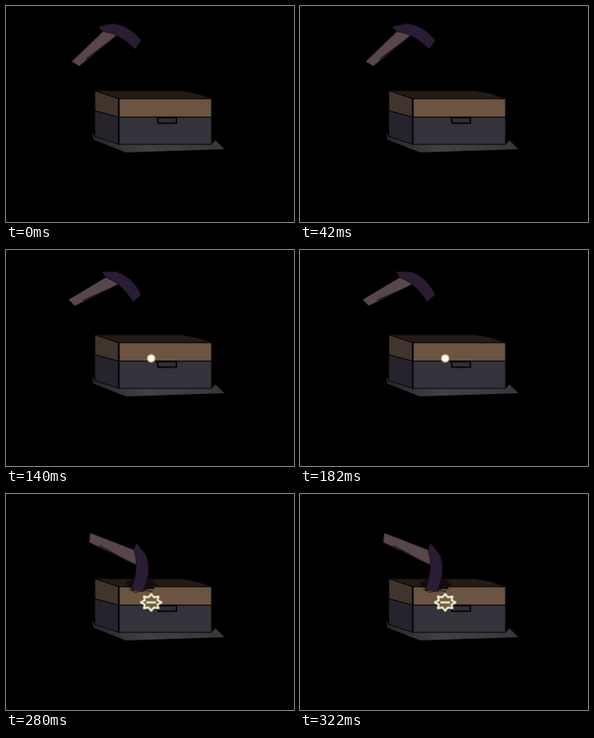
Recreate the animation shown at these times as an HTML page. Size 360 px wide and 270 px high, loop 350 ms.

```html
<!DOCTYPE html>
<html lang="en">
<head>
<meta charset="utf-8">
<title>Hammer and box</title>
<style>
  html, body { margin: 0; width: 100%; height: 100%; overflow: hidden; background: #000; }
  svg { display: block; width: 100vw; height: 100vh; }
  .ink { stroke: #09060b; stroke-width: 1.2; stroke-linejoin: round; }
  #hammer .ink { stroke-width: .6; }
</style>
</head>
<body>
<svg viewBox="0 0 360 270">
  <defs>
    <linearGradient id="stone" x2="1">
      <stop offset="0" stop-color="#26262a"/>
      <stop offset=".4" stop-color="#414145"/>
      <stop offset="1" stop-color="#37373b"/>
    </linearGradient>
  </defs>
  <path fill="url(#stone)" d="M108 158L111 163 142 173H257L262 168 273 179 150 183 109 167Z"/>
  <g class="ink">
    <path fill="#241b14" d="M111 106H218Q238 108 257 116H141Z"/>
    <path fill="#40352c" d="M111 106L141 116V139L111 131Z"/>
    <path fill="#26232c" d="M111 131L141 139V173L111 163Z"/>
    <path fill="#6b5441" d="M141 116H257V139H141Z"/>
    <path fill="#34333b" d="M141 139H257V173H141Z"/>
    <path fill="none" stroke-width="2.2" d="M141 116V173"/>
    <path fill="#302e36" stroke-width="2" d="M189 139.500H213V146.500H190Z"/>
  </g>
  <g id="dent" transform="translate(169 113)">
    <path id="hole" fill="#120d0d"/>
    <path fill="none" stroke="#38291f" stroke-width="1.5" d="M-15 6L-7 10 4 7 14 9"/>
  </g>
  <!-- Drawn around the joint of head and handle -->
  <g id="hammer">
    <path class="ink" fill="#58464a" d="M-55 20L-8 -8 9 0 -47 28Z"/>
    <path fill="none" stroke="#130d11" stroke-width="1.2" d="M-37 21L-2 6"/>
    <path class="ink" fill="#2a1c33" d="M-13 -15L5 -15Q25 -9 36 14L26 23Q10 -2 -9 -8Z"/>
  </g>
  <g transform="translate(181.500 135.500)">
    <circle id="dot" r="1" fill="#fffdf2" stroke="#b8894a" stroke-width=".2"/>
    <g id="burst">
      <path id="rays" fill="#6f5f46" stroke="#fffbd7" stroke-width="2.2" stroke-linejoin="round"/>
      <path stroke="#fff6d0" stroke-width="2.4" d="M-6 0H6"/>
    </g>
  </g>
</svg>
<script>
const STEP = 70;
const $ = id => document.getElementById(id);

// Closed zigzag around the origin, alternating between two radii.
function star(points, rx, ry, inner) {
  const corners = Array.from({ length: points * 2 }, (_, i) => {
    const a = i * Math.PI / points, r = i % 2 ? inner : 1;
    return [rx * r * Math.cos(a), ry * r * Math.sin(a)].map(v => v.toFixed(1));
  });
  return 'M' + corners.join('L') + 'Z';
}

// Holds each value for one step, then jumps to the next.
function hold(id, prop, values) {
  const frames = [...values, values[0]].map((v, i) => ({
    [prop]: v, offset: i / values.length, easing: 'step-end'
  }));
  $(id).animate(frames, { duration: STEP * values.length, iterations: Infinity });
}

const pose = (x, y, turn, size = 1) =>
  `translate(${x}px, ${y}px) rotate(${turn}deg) scale(${size})`;

$('hole').setAttribute('d', star(9, 22, 9, .75));
$('rays').setAttribute('d', star(8, 13, 10.5, .66));

const raised = pose(131, 37.5, -13);
hold('hammer', 'transform', [raised, raised, pose(133, 42, 0), pose(158, 75, 42, 1.12), pose(159, 82, 52, 1.08)]);
hold('dent', 'opacity', [0, 0, 0, 1, 1]);
hold('dot', 'transform', [0, 2.7, 5, 5.2, 0].map(r => `scale(${r})`));
hold('burst', 'opacity', [0, 0, 0, 0, 1]);
</script>
</body>
</html>
```
